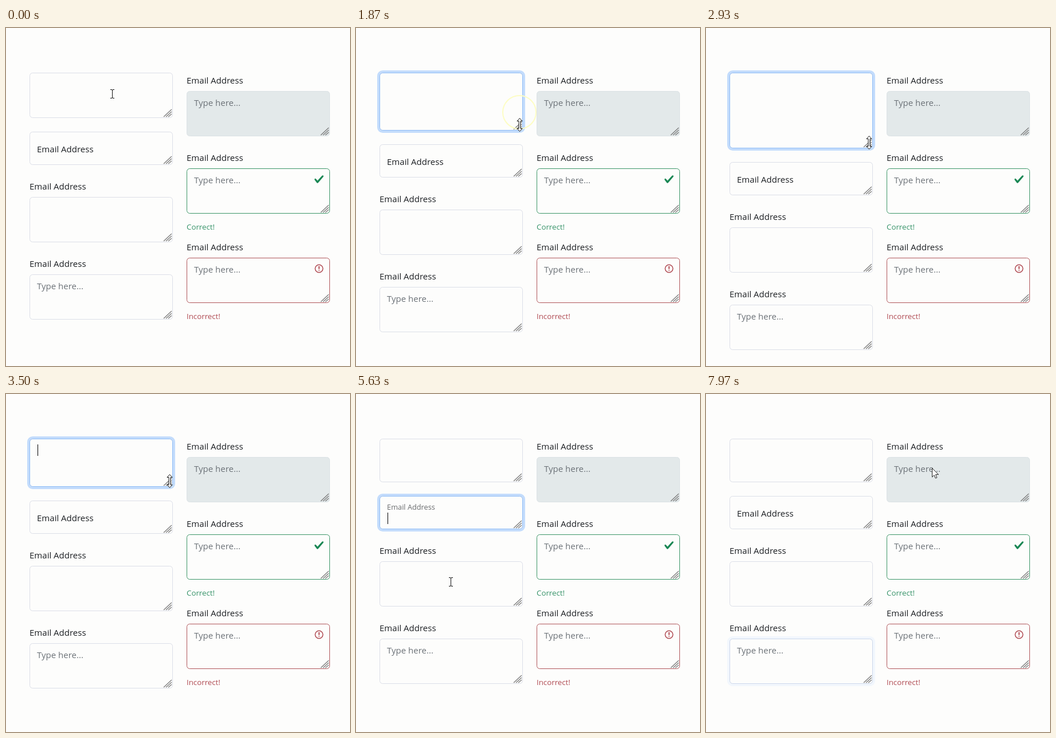
An HTML page for the animation above (8000 ms loop, 600 px wide and 590 px high).

```html
<!DOCTYPE html>
<html lang="en">
<head>
<meta charset="utf-8">
<title>Textarea states</title>
<style>
  html, body { margin: 0; width: 100%; height: 100%; overflow: hidden; background: #fdfdfc; }
  svg { display: block; width: 100%; height: 100%; }
  text { font: 15px "Open Sans", "Noto Sans", sans-serif; fill: #1c1f23; }
  .hint { fill: #6c7278; }
  .note { font-size: 13.3px; }
  .box { fill: none; stroke: #dcdfe8; }
  .disabled { fill: #e3e9ea; stroke: #dbe2e5; }
  .valid { stroke: #3c9668; }
  .invalid { stroke: #b0555a; }
  .focus { fill: none; stroke: #90bdf6; }
  .ring { fill: none; stroke: #c3dcfc; stroke-width: 4; }
  .grip { fill: none; stroke: #7d7d7d; stroke-width: 1.3; }
  .ripple { fill: none; stroke: #fdfdc4; stroke-width: 2; }
</style>
</head>
<body>
<svg id="stage" viewBox="0 0 600 590"></svg>
<script>
const LOOP = 8000, WIDTH = 250, LEFT = 41, RIGHT = 315, BLINK = 530;
const DRAG = { from: 1430, to: 3730, y: 147 };
const GREEN = '#198754', RED = '#b04a52';
const stage = document.getElementById('stage');

function add(parent, tag, attrs = {}, content = '') {
  const node = document.createElementNS('http://www.w3.org/2000/svg', tag);
  set(node, attrs);
  node.textContent = content;
  return parent.appendChild(node);
}
function set(node, attrs) {
  for (const name in attrs) node.setAttribute(name, attrs[name]);
}
const clamp = v => Math.min(1, Math.max(0, v));
const smooth = v => { v = clamp(v); return v * v * (3 - 2 * v); };
const mix = (a, b, k) => a + (b - a) * k;

// A field is a group with its origin at the box's top left corner.
function makeField(x, y, { height = 79, label, hint, kind = '' }) {
  const group = add(stage, 'g', { transform: `translate(${x} ${y})` });
  const rect = (cls, grow) => add(group, 'rect', {
    class: cls, x: -grow, y: -grow, rx: 5.5 + grow,
    width: WIDTH + 2 * grow, height: height + 2 * grow
  });
  const ring = rect('ring', 2);
  const box = rect('box ' + kind, -0.5);
  const focus = rect('focus', -0.5);
  const grip = add(group, 'path', { class: 'grip', d: 'M-14 0L0-13M-10 0L0-9M-6 0L0-5' });
  if (label) add(group, 'text', { x: 0, y: -13 }, label);
  if (hint) add(group, 'text', { x: 13, y: 26, class: 'hint' }, hint);
  const caret = add(group, 'rect', { x: 14, y: 10, width: 1, height: 20 });
  for (const node of [ring, focus, caret]) set(node, { opacity: 0 });
  const field = { x, y, height, kind, group, ring, box, focus, grip, caret };
  setHeight(field, height);
  return field;
}
function setHeight(field, height) {
  field.height = height;
  set(field.ring, { height: height + 4 });
  set(field.box, { height: height - 1 });
  set(field.focus, { height: height - 1 });
  set(field.grip, { transform: `translate(${WIDTH - 2} ${height - 2})` });
}

const label = 'Email Address', hint = 'Type here...';
const left = [
  makeField(LEFT, 78, {}),
  makeField(LEFT, 181, { height: 58 }),
  makeField(LEFT, 295, { label }),
  makeField(LEFT, 430, { label, hint })
];
const right = [
  makeField(RIGHT, 110, { label, hint, kind: 'disabled' }),
  makeField(RIGHT, 245, { label, hint, kind: 'valid' }),
  makeField(RIGHT, 401, { label, hint, kind: 'invalid' })
];
const tops = left.map(f => f.y);
const fields = [...left, ...right];

const floating = add(left[1].group, 'text', { x: 13, y: 36 }, label);
set(left[1].caret, { y: 29 });

add(right[1].group, 'text', { x: 0, y: 107, class: 'note', style: 'fill:#38946a' }, 'Correct!');
add(right[2].group, 'text', { x: 0, y: 107, class: 'note', style: `fill:${RED}` }, 'Incorrect!');
add(right[1].group, 'path', {
  transform: 'translate(222 10) scale(2.25)', fill: GREEN,
  d: 'M2.3 6.73L.6 4.53c-.4-1.04.46-1.4 1.1-.8l1.1 1.4 3.4-3.8c.6-.63 1.6-.27 1.2.7l-4 4.6c-.43.5-.8.4-1.1.1z'
});
const alert = add(right[2].group, 'g', {
  transform: 'translate(222 10) scale(1.5)', fill: 'none', stroke: RED, 'stroke-linejoin': 'round'
});
add(alert, 'circle', { cx: 6, cy: 6, r: 4.5 });
add(alert, 'path', { d: 'M5.8 3.6h.4L6 6.5z' });
add(alert, 'circle', { cx: 6, cy: 8.2, r: 0.6, fill: RED, stroke: 'none' });

const ripple = add(stage, 'circle', { class: 'ripple' });
const pointer = add(stage, 'g');
const shapes = {
  beam: add(pointer, 'path', {
    d: 'M-3-7.5H-1Q.5-7.5.5-6 .5-7.5 2-7.5H4M.5-6V6M-3 7.5H-1Q.5 7.5.5 6 .5 7.5 2 7.5H4',
    fill: 'none', stroke: '#111'
  }),
  resize: add(pointer, 'path', {
    d: 'M.5-11.5L5-6.5H2V6.5H5L.5 11.5-4 6.5H-1V-6.5H-4Z', fill: '#fff', stroke: '#111'
  }),
  arrow: add(pointer, 'path', {
    d: 'M.5.5V16L4 12.6 6.3 18 8.8 17 6.5 11.6H11.5Z', fill: '#fff', stroke: '#222'
  })
};

// Pointer stops: time, x, y
const path = [
  [0, 185, 115], [720, 185, 115], [1200, 285, 147], [DRAG.from, 285, DRAG.y],
  [2600, 283.5, 215], [DRAG.to, 285, 144], [3900, 285, 144], [4230, 198, 216],
  [5230, 198, 216], [5600, 165, 328], [6200, 165, 328], [6560, 129, 439],
  [7270, 129, 439], [7940, 394, 129], [LOOP, 394, 129]
];
// Which field has focus, when it gets and loses it, and when its caret starts
const focuses = [
  { from: 170, to: 4470, caret: 170 },
  { from: 4470, to: 5640, caret: 4470 },
  { from: 5640, to: 6800, caret: 5640, caretEnd: 6560 },
  { from: 6800, to: 7865, caret: 6560 }
];
// Ripples: start and how long they stay
const presses = [[250, 330], [DRAG.from, 870], [4550, 330], [5640, 330], [6800, 330]];

function pointerAt(t) {
  const i = Math.max(1, path.findIndex(p => p[0] > t));
  const [t0, x0, y0] = path[i - 1], [t1, x1, y1] = path[i];
  const k = smooth((t - t0) / (t1 - t0));
  return { x: Math.round(mix(x0, x1, k)), y: Math.round(mix(y0, y1, k)) };
}

function pointerKind({ x, y }) {
  const hit = fields.find(f => x >= f.x && x < f.x + WIDTH && y >= f.y && y < f.y + f.height);
  if (!hit || hit.kind === 'disabled') return 'arrow';
  const onGrip = x > hit.x + WIDTH - 16 && y > hit.y + hit.height - 16;
  return onGrip ? 'resize' : 'beam';
}

function render(t) {
  const dragTime = Math.min(DRAG.to, Math.max(DRAG.from, t));
  const shift = pointerAt(dragTime).y - DRAG.y;
  setHeight(left[0], 79 + shift);

  left.forEach((field, i) => {
    if (i) {
      field.y = tops[i] + shift;
      set(field.group, { transform: `translate(${LEFT} ${field.y})` });
    }
    const { from, to, caret, caretEnd = to } = focuses[i];
    const glow = smooth((t - from) / 150) - smooth((t - to) / 150);
    const blinkOn = t >= caret && t < caretEnd && Math.floor((t - caret) / BLINK) % 2 === 0;
    set(field.ring, { opacity: glow });
    set(field.focus, { opacity: glow });
    set(field.caret, { opacity: +blinkOn });
  });

  const { from, to } = focuses[1];
  const lift = smooth((t - from) / 100) - smooth((t - to) / 100);
  set(floating, {
    transform: `translate(${2.04 * lift} ${-6.8 * lift}) scale(${1 - 0.15 * lift})`,
    opacity: 1 - 0.35 * lift
  });

  const press = presses.find(([begin, life]) => t >= begin && t < begin + life);
  set(ripple, { opacity: press ? 1 : 0 });
  if (press) {
    const { x, y } = pointerAt(press[0]);
    set(ripple, { cx: x, cy: y, r: 29 * smooth((t - press[0]) / 250) });
  }

  const at = pointerAt(t), kind = pointerKind(at);
  set(pointer, { transform: `translate(${at.x} ${at.y})` });
  for (const name in shapes) set(shapes[name], { opacity: name === kind ? 1 : 0 });
}

const start = performance.now();
function tick() {
  render((performance.now() - start) % LOOP);
  requestAnimationFrame(tick);
}
tick();
</script>
</body>
</html>
```
